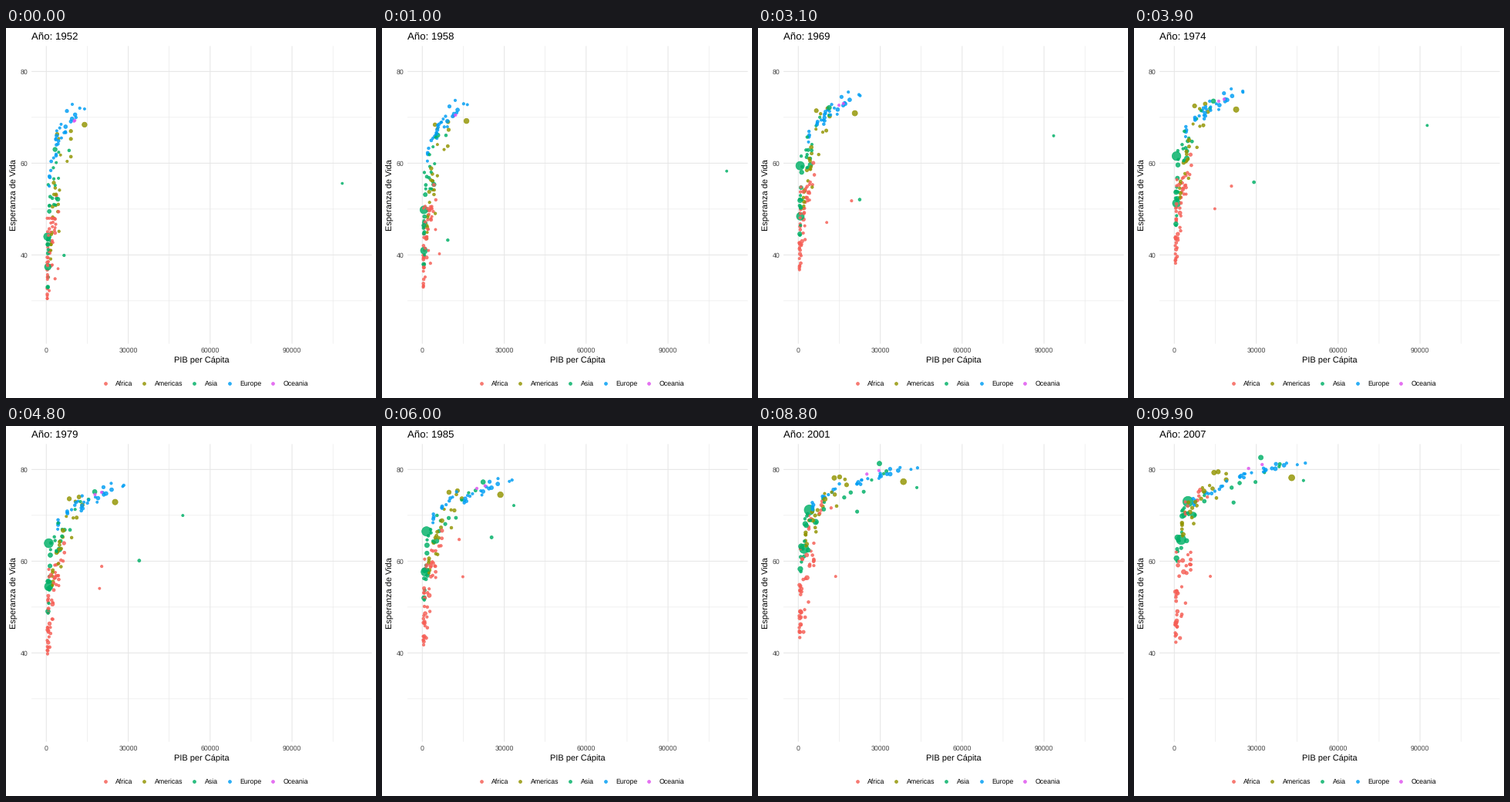
These frames come from a looping animation (480x480 px, 10 s). A matplotlib script:

```python
import numpy as np
import matplotlib.pyplot as plt
from matplotlib.animation import FuncAnimation

SIZE, FRAMES, LOOP_MS = 480, 100, 10000
PX_X, X0 = 3.5417, 52.3      # pixels per 1000 of income, pixel of zero
PX_Y, Y80 = 5.95, 56.4       # pixels per year of life, pixel of 80
LEFT, RIGHT, TOP, BOTTOM = 33, 474.5, 23.4, 409.6
COLORS = {"Africa": "#f65f56", "Americas": "#929400", "Asia": "#00b067",
          "Europe": "#009ef4", "Oceania": "#df54ef"}
ALPHA = 0.82

plt.rcParams.update({"font.family": "Liberation Sans", "text.hinting": "none"})
rng = np.random.default_rng(11)
t = np.linspace(0, 1, FRAMES)
years = 1952 + 55 * t
dots = []


def add(region, income, life, people, depth=None):
    depth = rng.random() if depth is None else depth
    dots.append((depth, COLORS[region], income, life, people))


def loner(region, people, points, depth=None):
    """A country that leaves the crowd, through (year, income, life) points."""
    when, income, life = zip(*points)
    add(region, np.interp(years, when, income), np.interp(years, when, life),
        np.interp(t, [0, 1], people), depth)


def power(p):
    return t ** p


def spread(ends, q, log=False):
    lo, hi = ends
    return lo * (hi / lo) ** q if log else lo + (hi - lo) * q


def crowd(region, n, income, life, growth, health, largest, birth, mix=.15, dip=0):
    """n countries ranked from poor to rich; income and life give the
    range at the start and at the end of the loop."""
    for q in (np.arange(n) + .5) / n:
        r = np.clip(q + rng.normal(0, mix, 4), 0, 1)
        g0, g1 = (spread(e, k, log=True) for e, k in zip(income, r[:2]))
        l0, l1 = (spread(e, k) for e, k in zip(life, (r[2], (r[2] + r[3]) / 2)))
        people = largest ** rng.random()
        epidemic = dip * rng.random() * np.sin(np.pi * t ** 2)
        add(region, g0 + (g1 - g0) * growth, l0 + (l1 - l0) * health + epidemic,
            people * (1 + (birth - 1) * t))


slump = t + .4 * t * np.sin(2 * np.pi * t)   # growth, crisis, recovery

crowd("Europe", 18, [(3.3, 14), (21, 48)], [(64, 73), (78, 81.7)],
      power(1.1), t, 70, 1.2, mix=.1)
crowd("Europe", 12, [(1, 7), (6, 25)], [(55, 67), (72, 77.5)],
      slump, power(.5), 35, 1.4, mix=.1)
crowd("Americas", 24, [(1.6, 9), (2.8, 19)], [(39, 67), (65, 79.5)],
      power(1.2), power(.8), 45, 3.2)
crowd("Asia", 22, [(.4, 4.5), (.8, 11)], [(33, 59), (60, 75)],
      power(2.2), power(.75), 80, 3.2)
crowd("Asia", 6, [(1, 9), (21, 47)], [(47, 66), (75, 82)],
      power(2), power(.75), 20, 2.5, mix=.1)
crowd("Africa", 8, [(1.4, 4.5), (4, 12)], [(41, 53), (70, 76)],
      t, t, 20, 3.3)
crowd("Africa", 42, [(.35, 3.2), (.35, 6)], [(30.5, 48), (42, 62)],
      t, power(.75), 30, 3.5, mix=.25, dip=6)
crowd("Oceania", 2, [(10, 10.6), (25, 35)], [(69.1, 69.4), (79.8, 81.5)],
      power(1.1), t, 9, 2.1, mix=0)

loner("Asia", (.2, 2.5), [(1952, 108.4, 55.6), (1957, 113.5, 58), (1962, 95.5, 60.5),
                          (1967, 80.9, 64.6), (1972, 109.3, 67.7), (1977, 59.3, 69.3),
                          (1982, 31.4, 71.3), (2007, 47.3, 77.6)])
loner("Asia", (556, 1319), [(1952, .4, 44), (1957, .6, 50.5), (1962, .5, 44.5),
                            (1967, .6, 58.4), (1982, 1, 65.5), (2007, 5, 73)], .17)
loner("Asia", (372, 1110), [(1952, .55, 37.4), (1982, .9, 56.6),
                            (2007, 2.5, 64.7)], .41)
loner("Asia", (86, 127), [(1952, 3.2, 63), (1967, 9.8, 71.4),
                          (1992, 26.8, 79.4), (2007, 31.7, 82.6)], .46)
loner("Asia", (4, 28), [(1952, 6.5, 39.9), (1962, 11.6, 45.9), (1977, 34.2, 58.7),
                        (1982, 33.7, 63), (1987, 21.2, 66.3), (2007, 21.7, 72.8)])
loner("Americas", (158, 301), [(1952, 14, 68.4), (1972, 21.8, 71.3),
                               (1992, 32, 76.1), (2007, 43, 78.2)], .95)
loner("Africa", (1, 6), [(1952, 2.4, 42.7), (1962, 6.8, 47.8), (1967, 18.8, 50.2),
                         (1977, 22, 57.4), (1987, 11.8, 66.2), (2007, 12.1, 74)])
loner("Africa", (.4, 1.5), [(1952, 4.3, 37), (1972, 11.4, 48.7), (1977, 21.7, 52.8),
                            (1982, 15.1, 56.6), (2007, 13.2, 56.7)])

dots.sort(key=lambda d: d[0])
fills = [d[1] for d in dots]
income, life, people = (np.array([d[k] for d in dots]) for k in (2, 3, 4))


def area(size):
    return (0.75 * (2.845 * size + 0.945)) ** 2


xs, ys = X0 + PX_X * income, Y80 + PX_Y * (80 - life)
areas = area(1 + 5 * np.sqrt(people / 1319))

fig = plt.figure(figsize=(SIZE / 72, SIZE / 72), dpi=72, facecolor="white")
ax = fig.add_axes([0, 0, 1, 1])
ax.set(xlim=(0, SIZE), ylim=(SIZE, 0))
ax.axis("off")


def label(x, y, text, size=8.8, color="black", ha="left", **kw):
    return ax.text(x, y, text, size=size, color=color, ha=ha, va="baseline", **kw)


def gridline(x, y, major):
    ax.plot(x, y, color="#e7e7e7", lw=1.07 if major else .6, zorder=1,
            snap=False, solid_capstyle="butt")


def circles(x, y, s, c):
    return ax.scatter(x, y, s=s, c=c, edgecolors=c, lw=.71, alpha=ALPHA,
                      zorder=3, snap=False)


for v in range(0, 106, 15):
    x = X0 + PX_X * v
    gridline([x, x], [TOP, BOTTOM], v % 30 == 0)
    if v % 30 == 0:
        label(x, 421, str(v * 1000), color="#434343", ha="center")
for v in range(30, 81, 10):
    y = Y80 + PX_Y * (80 - v)
    gridline([LEFT, RIGHT], [y, y], v % 20 == 0)
    if v % 20 == 0:
        label(28.2, y + 3.3, str(v), color="#434343", ha="right")

label(253.7, 434, "PIB per Cápita", 11, ha="center")
label(14, 216.5, "Esperanza de Vida", 11, ha="center", rotation=90,
      rotation_mode="anchor")
title = label(33, 15, "", 13.2)

for x, (name, color) in zip((128.6, 179.3, 244.1, 289.7, 346.1), COLORS.items()):
    circles([x], [460.5], area(1.5), color)
    label(x + 13.7, 464, name)

cloud = circles(xs[:, 0], ys[:, 0], areas[:, 0], fills)


def draw(k):
    cloud.set_offsets(np.column_stack([xs[:, k], ys[:, k]]))
    cloud.set_sizes(areas[:, k])
    title.set_text(f"Año: {round(years[k])}")
    return cloud, title


anim = FuncAnimation(fig, draw, frames=FRAMES, interval=LOOP_MS / FRAMES,
                     repeat=True, repeat_delay=0)
plt.show()
```
